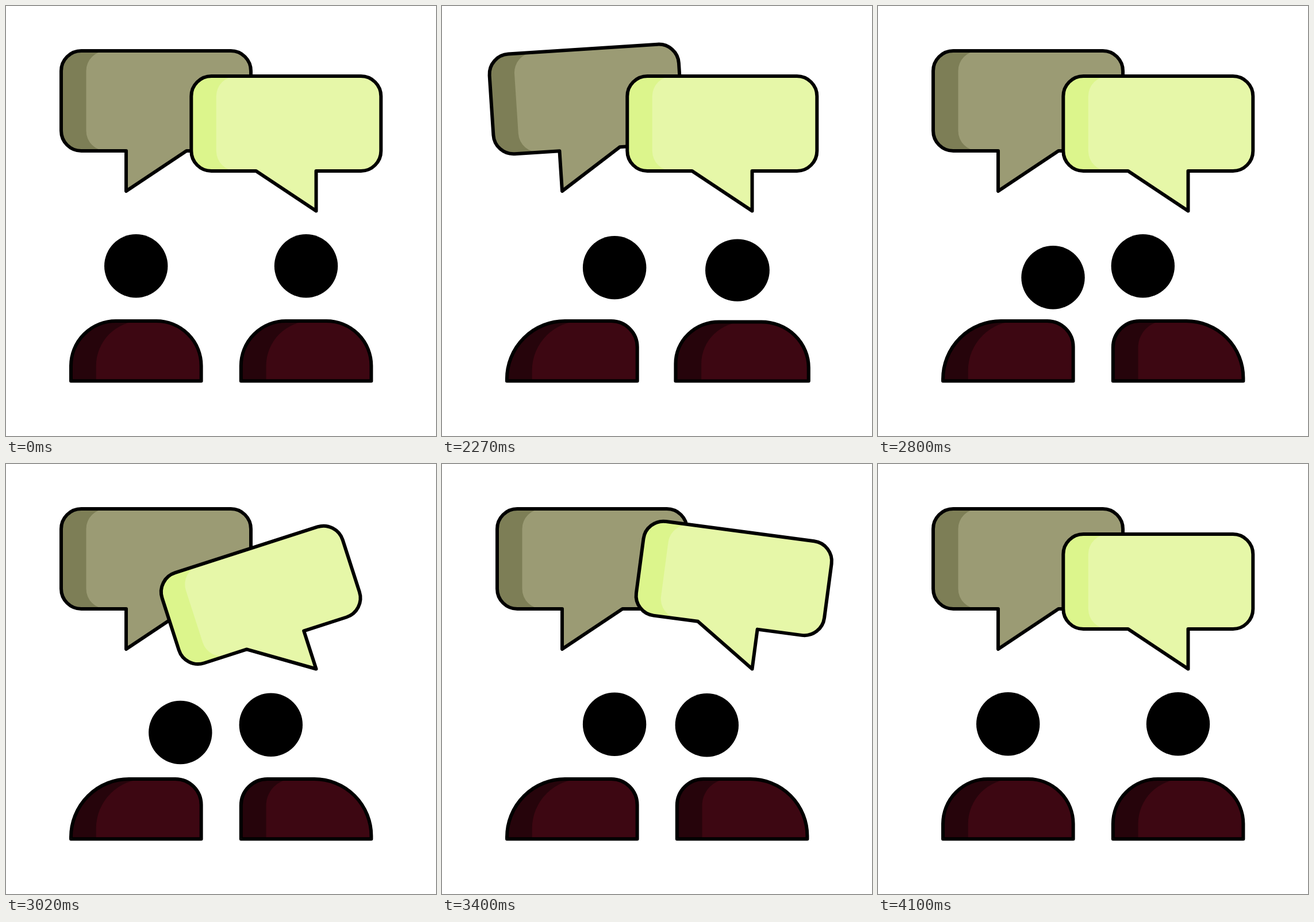
Write an HTML page with a canvas that moves like this. It is 748 px wide and 748 px high and loops after 4.12 s.

```html
<!DOCTYPE html>
<html>
<head>
<meta charset="utf-8">
<style>
html, body { margin: 0; width: 100%; height: 100%; overflow: hidden; background: #fff; }
canvas { display: block; }
</style>
</head>
<body>
<canvas id="stage" width="748" height="748"></canvas>
<script>
const ctx = document.getElementById('stage').getContext('2d');
const LOOP = 4120, HOLD = 2020;

const clamp = v => Math.max(0, Math.min(1, v));
const mix = (a, b, p) => a + (b - a) * p;
const ease = p => (1 - Math.cos(Math.PI * clamp(p))) / 2;
const hump = (t, from, to) => Math.sin(Math.PI * clamp((t - from) / (to - from))) ** 2;

// Damped swing of a speech bubble: [ms after start, degrees]
const swing = [[0, 0], [95, -21], [205, 15.2], [315, -15], [425, 9], [567, -8.8], [670, 3.4], [745, 0]];

function swingAngle(t) {
  const i = swing.findIndex(key => key[0] > t);
  if (i < 1) return 0;
  const [t0, a0] = swing[i - 1], [t1, a1] = swing[i];
  return mix(a0, a1, ease((t - t0) / (t1 - t0))) * Math.PI / 180;
}

function roundBox(x, y, w, h, radii) {
  const path = new Path2D();
  path.roundRect(x, y, w, h, radii);
  return path;
}

// Dark fill, lighter inner part, black outline
function shaded(path, inner, dark, light) {
  ctx.fillStyle = dark;
  ctx.fill(path);
  ctx.save();
  ctx.clip(path);
  ctx.fillStyle = light;
  ctx.fill(inner);
  ctx.restore();
  ctx.stroke(path);
}

function bubble(b, angle) {
  const { x, y, h, tail, tip, dark, light } = b;
  const w = 330, r = 35, bottom = y + h;
  const path = new Path2D();
  path.moveTo(x + r, y);
  path.arcTo(x + w, y, x + w, bottom, r);
  path.arcTo(x + w, bottom, x, bottom, r);
  path.lineTo(tail[1], bottom);
  path.lineTo(...tip);
  path.lineTo(tail[0], bottom);
  path.arcTo(x, bottom, x, y, r);
  path.arcTo(x, y, x + w, y, r);
  path.closePath();
  const inner = roundBox(x + 43.5, y, w, h, r);
  inner.rect(tail[0] - 5, bottom - 1, 120, 80);
  ctx.save();
  ctx.translate(...tip);
  ctx.rotate(angle);
  ctx.translate(-tip[0], -tip[1]);
  shaded(path, inner, dark, light);
  ctx.restore();
}

function person(p, t) {
  const lean = ease((t - p.go) / 300) - ease((t - p.back) / 300);
  const squash = 4 * lean * (1 - lean);
  const nod = hump(t, ...p.nod);
  const [rl, rr, ri] = p.radii.map(r => mix(78, r, lean));

  ctx.beginPath();
  ctx.ellipse(p.x + p.shift * lean + p.nodX * nod, 452.3 + 16 * squash + p.nodY * nod,
    55.2 * (1 + 0.028 * squash), 55.2 * (1 - 0.038 * squash), 0, 0, 7);
  ctx.fillStyle = '#000';
  ctx.fill();

  ctx.save();
  ctx.translate(p.x, 655);
  ctx.scale(1 + 0.045 * squash, 1 - 0.03 * squash);
  shaded(roundBox(-113.2, -107, 226.6, 104.3, [rl, rr, 0, 0]),
    roundBox(-69.5, -107, 226.6, 110, [ri, 0, 0, 0]), '#26040b', '#3d0712');
  ctx.restore();
}

const bubbles = [
  { x: 96, y: 78, h: 174, tail: [209, 314], tip: [209, 322], start: 2002,
    dark: '#7d7e56', light: '#9b9b74' },
  { x: 322.3, y: 122, h: 165, tail: [435, 539.5], tip: [539.5, 356.5], start: 2950,
    dark: '#dcf58c', light: '#e6f7a8' }
];
const people = [
  { x: 226.2, shift: 73.8, go: 1985, back: 3790, radii: [101, 45, 86],
    nod: [2115, 3465], nodX: 4.5, nodY: 20 },
  { x: 522, shift: -61.2, go: 2200, back: 3500, radii: [46, 99, 46],
    nod: [2945, 3490], nodX: 0, nodY: 8 }
];

function draw(now) {
  const time = now % LOOP;
  const t = time < HOLD ? 0 : time;
  ctx.fillStyle = '#fff';
  ctx.fillRect(0, 0, 748, 748);
  ctx.lineWidth = 6;
  ctx.lineJoin = 'round';
  ctx.strokeStyle = '#000';
  for (const b of bubbles) bubble(b, swingAngle(t - b.start));
  for (const p of people) person(p, t);
}

const begin = performance.now();
function tick() {
  draw(performance.now() - begin);
  requestAnimationFrame(tick);
}
tick();
</script>
</body>
</html>
```
